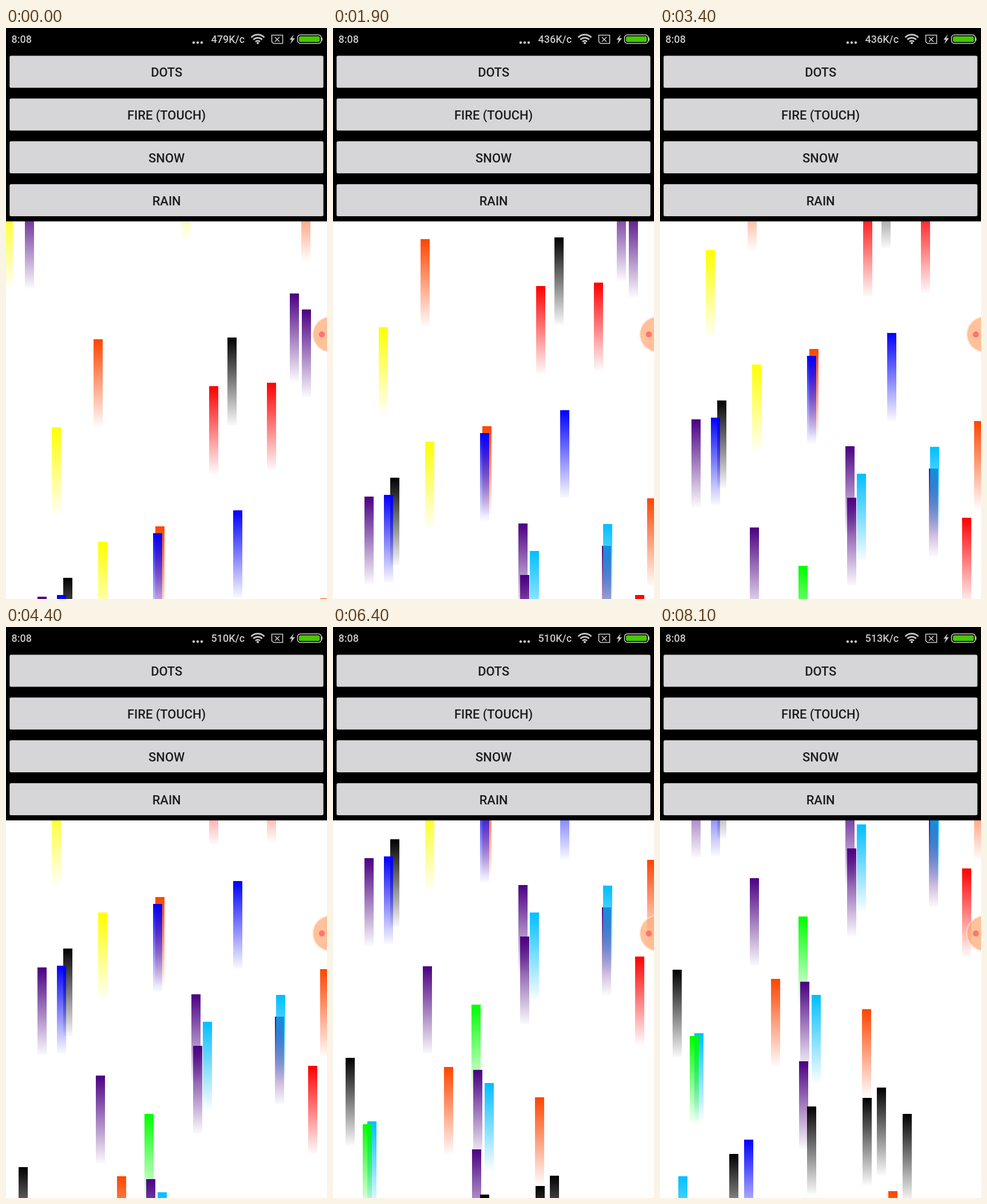
Write an HTML page that moves like this. It is 561 by 998 pixels and loops after 8200 ms.

```html
<!DOCTYPE html>
<html lang="en">
<head>
<meta charset="utf-8">
<title>Rain</title>
<style>
html, body { margin: 0; width: 100%; height: 100%; overflow: hidden; background: #fff; }
svg { display: block; width: 100%; height: 100%; }
text { font-family: Roboto, sans-serif; font-weight: 500; }
</style>
</head>
<body>
<svg viewBox="0 0 561 998">
  <defs id="defs"></defs>
  <rect width="561" height="998" fill="#fff"/>
  <g id="rain" shape-rendering="crispEdges"></g>
  <circle cx="567" cy="535.5" r="31" fill="none" stroke="#ffe6d8" stroke-opacity=".7" stroke-width="2"/>
  <circle cx="567" cy="535.5" r="30" fill="#ffa972" fill-opacity=".72"/>
  <circle cx="552" cy="535.5" r="5.3" fill="#ff5a68" fill-opacity=".75"/>
  <rect width="561" height="338"/>
  <g id="buttons" font-size="21.9" text-anchor="middle"></g>
  <g fill="#c9c9c9" font-size="18">
    <text x="9.5" y="26.3">8:08</text>
    <text x="358.5" y="26.3" id="speed"></text>
    <circle cx="328" cy="25.5" r="2.2"/>
    <circle cx="335" cy="25.5" r="2.2"/>
    <circle cx="342" cy="25.5" r="2.2"/>
    <circle cx="440" cy="26.3" r="2"/>
    <path d="M503 11l-7.5 9.5h4l-2.500 7.500 8-10h-4.500z"/>
    <rect x="551" y="16.500" width="2" height="6" rx="1"/>
  </g>
  <g fill="none" stroke="#c9c9c9">
    <path stroke-width="2.6" d="M428.500 16.500a16 16 0 0 1 23 0M432.300 20.300a11 11 0 0 1 15.400 0M436 24a5.600 5.600 0 0 1 8 0"/>
    <path stroke-width="1.6" d="M464.500 12.500h19v14.500h-16l-3-3zM470 16l8 8m0-8l-8 8"/>
    <rect x="509.500" y="12" width="41.500" height="15" rx="5" stroke-width="1.600"/>
  </g>
  <rect x="512" y="14.500" width="36.500" height="10" rx="3" fill="#48c800"/>
</svg>
<script>
const $ = id => document.getElementById(id);
const LOOP = 8200, STEP = 100, BAR_W = 16, BAR_H = 153;

const colors = {
  yellow: '#ff0', indigo: '#4b0082', orange: '#ff4500', black: '#000',
  red: '#f00', blue: '#00f', sky: '#00bfff', green: '#0f0'
};

// colour, left, top at time zero; later bars lie on top
const bars = `yellow -4 304,indigo 33 302,yellow 307 217,orange 516 253,indigo 496 464,indigo 517 492,
orange 153 544,black 387 541,red 355 626,red 456 620,yellow 80 698,blue 397 843,yellow 161 898,
orange 261 871,blue 257 883,black 100 961,indigo 55 994,blue 89 991,orange 549 997,indigo 324 1041,
sky 344 1089,indigo 470 1080,sky 472 1042,indigo 327 1131,red 528 1166,indigo 157 1183,green 242 1250,
black 22 1343,orange 194 1359,indigo 245 1364,sky 265 1387,orange 353 1412,sky 60 1454,green 52 1459,
indigo 243 1503,black 379 1549,black 354 1567,black 257 1582,black 424 1595,blue 147 1640,
black 121 1665,sky 32 1704,orange 399 1730`.split(',').map(s => s.trim().split(' '));

// time and distance risen; the pace drifts slightly
const climb = [[0, 0], [1200, 110.7], [2500, 229.2], [4400, 399.2], [5600, 517.8], [7200, 661.2], [8100, 743.8]];
const speeds = [[7900, 513], [4100, 510], [300, 436], [0, 479]];

$('defs').innerHTML = Object.entries(colors).map(([name, c]) =>
  `<linearGradient id="${name}" x2="0" y2="1"><stop stop-color="${c}"/>` +
  `<stop offset="1" stop-color="${c}" stop-opacity=".02"/></linearGradient>`).join('');

$('rain').innerHTML = bars.map(([name, x, y]) =>
  `<rect x="${x}" y="${y}" width="${BAR_W}" height="${BAR_H}" fill="url(#${name})"/>`).join('');

$('buttons').innerHTML = ['DOTS', 'FIRE (TOUCH)', 'SNOW', 'RAIN'].map((label, i) => {
  const y = 48.5 + i * 74.8;
  return `<rect x="6.3" y="${y}" width="548.4" height="56" rx="2.500" fill="#d6d5d7"/>` +
    `<text x="280.7" y="${y + 36.6}" fill="#1c1b1d">${label}</text>`;
}).join('');

function risen(t) {
  const i = climb.findIndex(([end]) => end >= t);
  if (i < 1) return 0;
  const [t0, d0] = climb[i - 1], [t1, d1] = climb[i];
  return d0 + (d1 - d0) * (t - t0) / (t1 - t0);
}

function draw(now) {
  const t = Math.floor(now % LOOP / STEP) * STEP;
  $('rain').setAttribute('transform', `translate(0 ${-Math.round(risen(t))})`);
  $('speed').textContent = speeds.find(([start]) => t >= start)[1] + 'K/c';
  requestAnimationFrame(draw);
}
draw(0);
</script>
</body>
</html>
```
